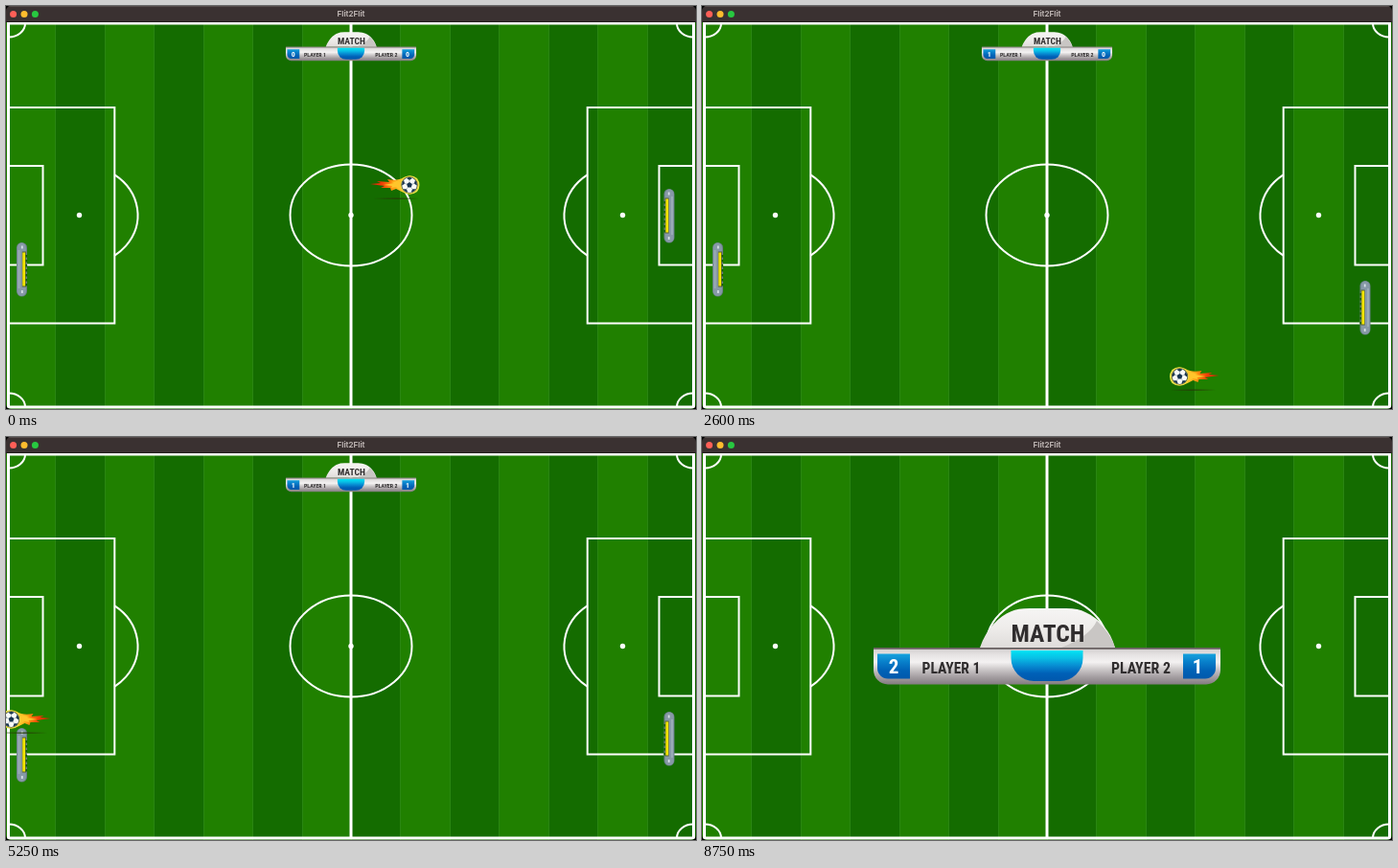
Write an HTML page with a canvas that moves like this. It is 720x421 px and loops after 8800 ms.

```html
<!DOCTYPE html>
<html lang="en">
<head>
<meta charset="utf-8">
<title>Flit2Flit</title>
<style>
html, body { margin: 0; width: 100%; height: 100%; overflow: hidden; background: #000; }
canvas { display: block; width: 720px; height: 421px; }
</style>
</head>
<body>
<canvas id="stage" width="720" height="421"></canvas>
<script>
const ctx = document.getElementById('stage').getContext('2d');
const LOOP = 8800, STEP = 50, END = 7550;
const NARROW = '"Oswald", "Roboto Condensed", "Open Sans Condensed", "Noto Sans", "Open Sans", sans-serif';

// Tracks are [time, value] points; two points at one time make a jump.
const ballX = [[0, 380], [1049, 717], [1050, 334.6], [1400, 447], [2063, 660], [2600, 488],
  [3550, 183], [4199, -25.6], [4200, 332], [5250, -5], [5272, -12], [7350, 654], [7550, 718]];
const ballY = [[0, 187], [543, 13], [1400, 288], [1761, 404], [2154, 278], [2547, 404], [2600, 387],
  [3550, 82], [3729, 24.5], [4911, 404], [5250, 295], [5362, 259], [5814, 404], [6988, 27],
  [7350, 142], [7550, 206]];
const leftY = [[0, 247], [2700, 247], [3350, 374], [4500, 374], [4950, 304], [5250, 304], [5450, 273]];
const rightY = [[0, 191], [650, 191], [1150, 298], [1900, 298], [1950, 287], [6300, 287], [6700, 337]];

function at(track, t) {
  for (let i = 1; i < track.length; i++) {
    const [t0, a] = track[i - 1], [t1, b] = track[i];
    if (t < t1) return a + (b - a) * (t - t0) / (t1 - t0);
  }
  return track[track.length - 1][1];
}

function vGrad(y0, y1, ...colors) {
  const g = ctx.createLinearGradient(0, y0, 0, y1);
  colors.forEach((c, i) => g.addColorStop(i / (colors.length - 1), c));
  return g;
}

function rect(x, y, w, h, fill) {
  ctx.fillStyle = fill;
  ctx.fillRect(x, y, w, h);
}

function round(x, y, w, h, r, fill) {
  ctx.fillStyle = fill;
  ctx.beginPath();
  ctx.roundRect(x, y, w, h, r);
  ctx.fill();
}

function dot(x, y, r, fill) {
  ctx.fillStyle = fill;
  ctx.beginPath();
  ctx.arc(x, y, r, 0, 7);
  ctx.fill();
}

function shape(d, fill) {
  ctx.fillStyle = fill;
  ctx.fill(new Path2D(d));
}

function arc(x, y, rx, ry, a, b) {
  ctx.beginPath();
  ctx.ellipse(x, y, rx, ry, 0, a, b);
  ctx.stroke();
}

function pitch() {
  for (let i = 0; i < 14; i++) {
    const x = Math.round(i * 51.43);
    rect(x, 17, 53, 404, i % 2 ? '#146c00' : '#208000');
    if (i) rect(x, 17, 1, 404, '#2a8612');
  }
  ctx.strokeStyle = '#fff';
  ctx.lineWidth = 3;
  ctx.strokeRect(2.5, 18, 715, 401);
  rect(358.5, 18, 3, 401, '#fff');
  ctx.lineWidth = 2;
  arc(360, 218.5, 63.5, 53, 0, 7);
  dot(360, 218.5, 2.7, '#fff');
  for (const side of [1, -1]) {
    ctx.save();
    ctx.translate(360, 0);
    ctx.scale(side, 1);
    ctx.translate(-360, 0);
    ctx.strokeRect(3, 106, 110.3, 225.5);
    ctx.strokeRect(3, 167, 35.5, 103.5);
    dot(76.5, 218.5, 2.7, '#fff');
    const a = 0.92;
    arc(76.5, 218.5, 61, 53, -a, a);
    arc(3, 18, 17, 14.5, 0, Math.PI / 2);
    arc(3, 419, 17, 14.5, -Math.PI / 2, 0);
    ctx.restore();
  }
}

function titleBar() {
  rect(0, 0, 720, 17, '#3a3131');
  rect(0, 0, 720, 1, '#554c4b');
  rect(0, 16, 720, 1, '#241f1e');
  dot(7.6, 8.5, 3.5, '#ff5f57');
  dot(19, 8.5, 3.5, '#febc2e');
  dot(30.4, 8.5, 3.5, '#28c840');
  text('Flit2Flit', 360, 11.2, 8, 40, '#bbb3b1', 'bold', 'Inter, sans-serif');
}

// Shrinks the type size when the face runs wider than the room.
function text(str, x, y, size, room, fill, style = 'bold extra-condensed', family = NARROW) {
  ctx.font = `${style} ${size}px ${family}`;
  const w = ctx.measureText(str).width;
  if (w > room) ctx.font = `${style} ${size * room / w}px ${family}`;
  ctx.fillStyle = fill;
  ctx.textAlign = 'center';
  ctx.fillText(str, x, y);
}

function board(top, scale, a, b) {
  ctx.save();
  ctx.translate(360, top);
  ctx.scale(scale, scale);
  shape('M-70 0C-63-20-50-33-37-38Q-31-41-18-41H20Q33-41 40-37C55-30 66-18 71 0Z',
    vGrad(-41, 0, '#f6f5f4', '#eeecea', '#dfdcda'));
  shape('M15 0Q45-12 52-28Q66-15 71 0Z', '#c9c6c4');
  round(-181, 0, 362, 38.5, [1, 1, 15, 15],
    vGrad(0, 38, '#cfcbcb', '#e6e3e3', '#f4f2f2', '#cbc7c8', '#a6a0a3', '#857e82'));
  rect(-181, 0, 362, 1.8, '#6a6162');
  const blue = vGrad(6, 33, '#16a5df', '#087fca', '#0062b6', '#0058ab');
  round(-177, 6.5, 34, 26, [0, 0, 0, 11], blue);
  round(142, 6.5, 34, 26, [0, 0, 11, 0], blue);
  round(-37.5, 3, 75, 32, [0, 0, 24, 24],
    vGrad(3, 35, '#00e4f4', '#09bfe5', '#078cd2', '#0060b7', '#0058ad'));
  const ink = '#302d2e';
  text('MATCH', 1, -6, 33, 77, ink);
  text('PLAYER 1', -100, 27, 20, 61, ink);
  text('PLAYER 2', 98, 27, 20, 62, ink);
  text(a, -160, 27, 21, 15, '#fff');
  text(b, 157, 27, 21, 15, '#fff');
  ctx.restore();
}

function paddle(x, y, side) {
  ctx.save();
  ctx.translate(x, y);
  ctx.scale(side, 1);
  round(-5.5, 0, 11, 56.5, 5.5, '#697e88');
  round(-4.8, 0.6, 9.2, 55.3, 4.6, '#8799a7');
  rect(-4, 8, 2, 40, '#9aabb6');
  rect(0.3, 9.5, 4.2, 37, '#55633b');
  rect(0.8, 10.5, 2.8, 35, '#f4e500');
  for (let i = 0; i < 7; i++) rect(4, 13 + i * 5, 1.6, 2.5, '#175f0b');
  for (const end of [3.5, 50]) rect(-0.6, end, 1.8, 3, '#d5dfe5');
  ctx.restore();
}

function ball(x, y, right) {
  ctx.save();
  ctx.translate(x + (right ? 41 : 10.5), y);
  if (!right) ctx.scale(-1, 1);
  shape('M-38 14Q-15 12.8 10 14Q-10 15.5-38 14Z', '#263d08');
  const fire = ctx.createLinearGradient(-41, 0, 6, 0);
  ['#e01805', '#f13a06', '#ff9711', '#ffdb35', '#e8e84a'].forEach((c, i) => fire.addColorStop(i / 4, c));
  shape('M-41-1L-30-2-34-4-21-3-23-6Q-12-4-6-8Q2-12 8-7Q13 0 8 7Q1 12-8 7L-14 4-19 6-20 3-30 3-26 1Z', fire);
  shape('M-27 0L-16-2-19-3-8-5V6L-14 2-19 3-18 1Z', '#ffc52b');
  dot(0, 0, 9.6, '#e1d247');
  dot(0, 0, 8.5, '#26352b');
  dot(0, 0, 7.9, '#f8faf7');
  ctx.beginPath();
  ctx.arc(0, 0, 7.9, 0, 7);
  ctx.clip();
  patch(0, 0, 3, 0);
  for (let i = 0; i < 5; i++) {
    const a = -Math.PI / 2 + i * Math.PI * 0.4;
    const c = Math.cos(a), s = Math.sin(a);
    patch(c * 8, s * 8, 2.9, Math.PI);
    ctx.strokeStyle = '#8795a0';
    ctx.lineWidth = 0.6;
    ctx.beginPath();
    ctx.moveTo(c * 3, s * 3);
    ctx.lineTo(c * 6, s * 6);
    ctx.stroke();
  }
  ctx.restore();
}

function patch(x, y, r, turn) {
  ctx.fillStyle = '#17334d';
  ctx.beginPath();
  for (let i = 0; i < 5; i++) {
    const a = turn - Math.PI / 2 + i * Math.PI * 0.4;
    ctx.lineTo(x + r * Math.cos(a), y + r * Math.sin(a));
  }
  ctx.fill();
}

function draw(now) {
  const t = Math.floor((now % LOOP) / STEP) * STEP;
  ctx.clearRect(0, 0, 720, 421);
  ctx.save();
  ctx.beginPath();
  ctx.roundRect(0, 0, 720, 421, 5);
  ctx.clip();
  pitch();
  if (t < END) {
    board(42.7, 0.376, t < 1050 ? '0' : '1', t < 4200 ? '0' : '1');
    paddle(16.5, at(leftY, t), 1);
    paddle(692, at(rightY, t), -1);
    ball(at(ballX, t), at(ballY, t), t < 2063 || t > 5272);
  } else {
    board(220, 1, '2', '1');
  }
  titleBar();
  ctx.restore();
}

const start = performance.now();
function tick() {
  draw(performance.now() - start);
  requestAnimationFrame(tick);
}
tick();
</script>
</body>
</html>
```
